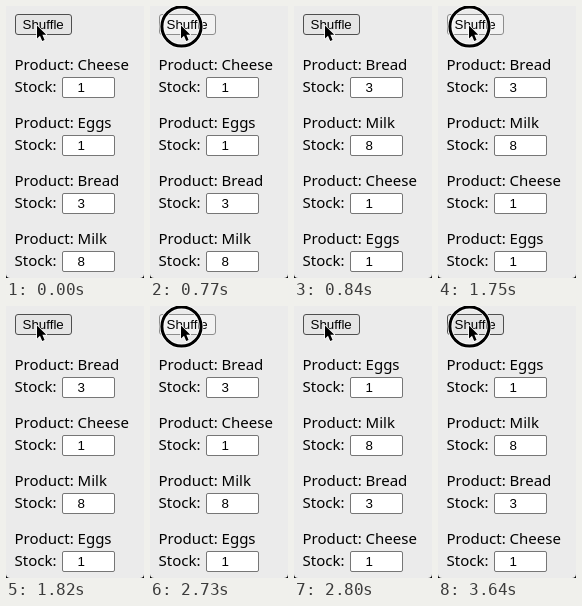
An HTML page for the animation above (3.71 s loop, 138 by 272 pixels).

```html
<!DOCTYPE html>
<html lang="en">
<head>
<meta charset="utf-8">
<title>Shuffle</title>
<style>
  html, body { margin: 0; width: 100%; height: 100%; overflow: hidden; background: #000; }
  svg { display: block; width: 138px; height: 272px; }
  .label { font: 15px "Noto Sans", "Open Sans", sans-serif; }
  .control { font: 13.333px "Liberation Sans", Arial, sans-serif; }
  #button rect { fill: #e5e5e5; stroke: #4f4f4f; }
  #button.pressed rect { fill: #f2f2f2; stroke: #8d8d8d; }
  #ring { fill: none; stroke: #000; stroke-width: 3; }
  #ring .halo { stroke: #fff; stroke-width: 4.6; }
</style>
</head>
<body>
<svg viewBox="0 0 138 272">
  <path d="M0 0H138V268Q138 272 134 272H4Q0 272 0 268Z" fill="#ebebeb"/>
  <g id="button">
    <rect x="9.5" y="8.5" width="56" height="20" rx="2.5"/>
    <text class="control" x="16.5" y="23">Shuffle</text>
  </g>
  <g id="list"></g>
  <g id="ring">
    <circle class="halo" cx="31.5" cy="20.5" r="19.6"/>
    <circle cx="31.5" cy="20.5" r="19.6"/>
  </g>
  <path d="M31 19.5V32.5L34 29.8L36.2 35L38.6 34L36.4 28.8H40.3Z" stroke="#fff" stroke-width="1.6" stroke-linejoin="round" paint-order="stroke"/>
</svg>
<script>
  const LOOP = 3710;
  const CLICK = 70;
  const ROW_HEIGHT = 58;
  const stock = { Cheese: 1, Eggs: 1, Bread: 3, Milk: 8 };

  // Each order holds until its click ends; the loop restarts before the last click presses the button.
  const phases = [
    { end: 840, order: ['Cheese', 'Eggs', 'Bread', 'Milk'] },
    { end: 1820, order: ['Bread', 'Milk', 'Cheese', 'Eggs'] },
    { end: 2800, order: ['Bread', 'Cheese', 'Milk', 'Eggs'] },
    { end: LOOP, order: ['Eggs', 'Milk', 'Bread', 'Cheese'] },
  ];

  const byId = id => document.getElementById(id);
  const button = byId('button');
  const list = byId('list');
  const ring = byId('ring');

  const row = (name, index) => `
    <g transform="translate(0 ${index * ROW_HEIGHT})">
      <text class="label" x="8.5" y="64">Product: ${name}</text>
      <text class="label" x="8.5" y="86">Stock:</text>
      <rect x="56.5" y="71.5" width="52" height="20" rx="1.5" fill="#fff" stroke="#767676"/>
      <text class="control" x="71.5" y="86">${stock[name]}</text>
    </g>`;

  let shown;
  const start = performance.now();

  function draw() {
    const time = (performance.now() - start) % LOOP;
    const phase = phases.find(p => time < p.end);
    const clicking = time >= phase.end - CLICK;
    if (phase !== shown) {
      list.innerHTML = phase.order.map(row).join('');
      shown = phase;
    }
    ring.style.display = clicking ? '' : 'none';
    button.classList.toggle('pressed', clicking && phase.end < LOOP);
    requestAnimationFrame(draw);
  }
  draw();
</script>
</body>
</html>
```
